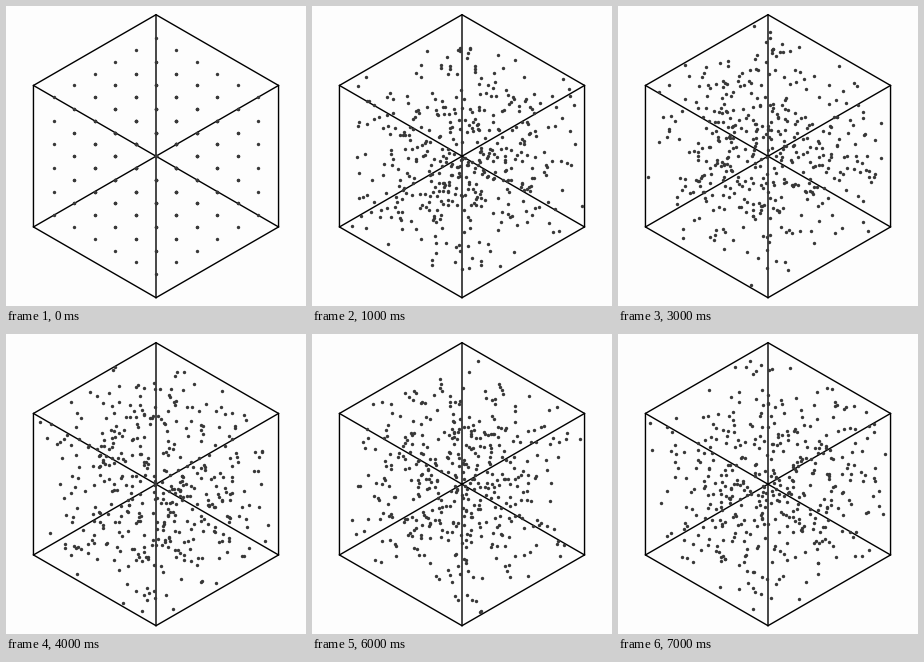
Recreate the animation shown at these times as a matplotlib script. Size 300 px wide and 300 px high, loop 8000 ms.

```python
import numpy as np
import matplotlib.pyplot as plt
from matplotlib.animation import FuncAnimation

SIZE = 300
DPI = 100
PX = 72 / DPI  # points per pixel
CENTER = np.array([150.0, 150.2])
RADIUS = 141.5
CELLS = 6
COUNT = 432
FRAMES = 8

angles = np.radians(np.arange(6) * 60 - 90)
corners = CENTER + RADIUS * np.column_stack([np.cos(angles), np.sin(angles)])
axes3d = corners[::2] - CENTER


def project(points):
    """View points of the unit cube along its main diagonal."""
    return CENTER + points @ axes3d


def cube_points(frame):
    """A regular grid first, then uniform random points."""
    if frame == 0:
        ticks = (np.arange(CELLS) + 0.5) / CELLS
        return np.stack(np.meshgrid(ticks, ticks, ticks), -1).reshape(-1, 3)
    return np.random.default_rng(frame).random((COUNT, 3))


fig = plt.figure(figsize=(SIZE / DPI, SIZE / DPI), dpi=DPI, facecolor="#fdfdfd")
ax = fig.add_axes([0, 0, 1, 1])
ax.set_xlim(0, SIZE)
ax.set_ylim(SIZE, 0)
ax.axis("off")

line = dict(color="black", lw=1.4 * PX, snap=False, zorder=1)
ax.add_patch(plt.Polygon(corners, fill=False, joinstyle="miter", **line))
for start, end in zip(corners[:3], corners[3:]):
    ax.plot(*np.array([start, end]).T, **line)

dots = ax.scatter([], [], s=(3.4 * PX) ** 2, color="#383838", lw=0, zorder=2)


def draw(frame):
    dots.set_offsets(project(cube_points(frame)))
    return (dots,)


anim = FuncAnimation(fig, draw, frames=FRAMES, interval=1000,
                     repeat=True, repeat_delay=0)
plt.show()
```
